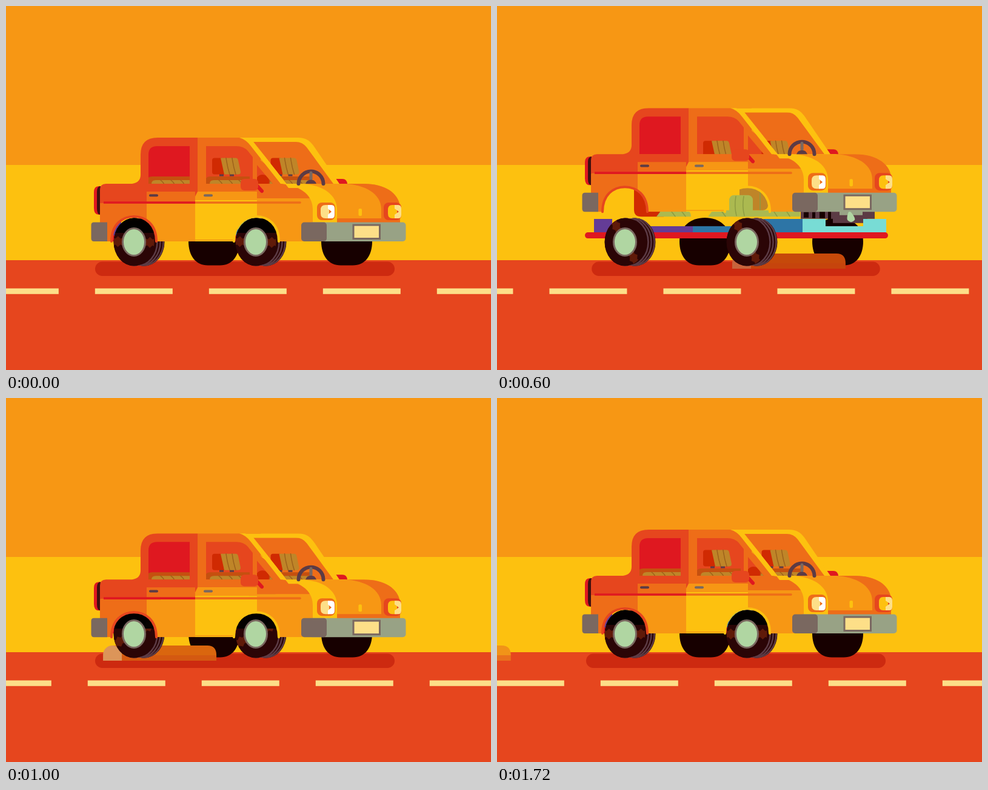
An HTML page for the animation above (1.74 s loop, 800 by 600 pixels).

```html
<!DOCTYPE html>
<html lang="en">
<head>
<meta charset="utf-8">
<title>Bouncing car</title>
<style>
html, body { margin: 0; width: 100%; height: 100%; overflow: hidden; background: #f79714; }
svg { display: block; width: 100vw; height: 100vh; }
.sky { fill: #f79714 } .sun { fill: #fdc10f } .red { fill: #e6461e } .rust { fill: #ee6d18 }
.ruby { fill: #df1820 } .seat { fill: #d02a02 } .tan { fill: #bf8528 } .brown { fill: #c5500f }
.green { fill: #abb950 } .plum { fill: #5c3b45 } .grey { fill: #7a6860 } .sage { fill: #98a285 }
.cream { fill: #fddf88 } .aqua { fill: #78dcd5 } .blue { fill: #2d75a6 } .violet { fill: #643c96 }
.night { fill: #170000 } .mint { fill: #b0d6a2 }
.line { fill: none; stroke-linecap: round }
</style>
</head>
<body>
<svg viewBox="0 0 800 600" preserveAspectRatio="none">
  <defs>
    <clipPath id="shell"><path d="M155 303Q155 293 165 293H208Q222 291 222 278V245Q222 217 250 217H482C494 217 501 222 507 230L550 293H590C625 293 647 308 650 330V388H451C451 360 432 348 413 348S376 360 376 388H249C249 360 230 348 211 348S174 360 174 388H158Q155 388 155 385Z"/></clipPath>
    <clipPath id="panes"><path id="glass" d="M235 293V245Q235 231 249 231H303V293ZM330 231H380Q392 231 399 239L407 249V293H330ZM414 262L440 293H414ZM408 224H478Q489 224 496 233L540 293H463Z"/></clipPath>
    <clipPath id="tyre"><ellipse rx="33.5" ry="39.5"/><ellipse cx="17" rx="33.5" ry="39.5"/></clipPath>
    <clipPath id="face"><ellipse rx="33.5" ry="39.5"/></clipPath>
    <g id="headrest">
      <path class="plum" d="M12 24h7v6h-7zM29 24h7v6h-7z"/>
      <path class="seat" d="M4 0H16L20 27H4Q0 27 0 23V4Q0 0 4 0Z"/>
      <path class="tan" d="M14 0H39Q42 0 43 4L47 23Q47 27 43 27H20Z"/>
      <path class="line" stroke="#9d611b" stroke-width="1.5" d="M23 0Q25 15 29 27M33 0Q35 15 39 27"/>
    </g>
    <g id="bench">
      <path class="brown" d="M0 18V7Q0 0 8 0H73V18Z"/>
      <path class="tan" d="M7 18V12Q7 6 14 6H73V18Z"/>
      <path class="line" stroke="#9d611b" stroke-width="1.5" d="M22 6Q26 9 28 13M39 6Q43 9 45 13M55 6Q59 9 61 13"/>
    </g>
  </defs>

  <rect class="sky" width="800" height="262"/>
  <rect class="sun" y="262" width="800" height="157"/>
  <rect class="red" y="419" width="800" height="181"/>
  <g id="dashes" class="cream"></g>
  <rect id="shadow" y="421.5" height="23.5" rx="11.7" fill="#cd2a10"/>

  <g class="night">
    <path id="far" d="M301 388C301 363 320 349 343 349S385 363 385 388C385 412 373 427.500 353 427.500H333C313 427.500 301 412 301 388Z"/>
    <use href="#far" x="219"/>
  </g>

  <g id="bump">
    <path id="bumpTop" d="M14 408H172Q187 408 187 424H14Z"/>
    <path id="bumpSide" d="M14 424H187V433H14Z"/>
    <path id="bumpCap" d="M0 433V423A15.500 15 0 0 1 31 423V433Z"/>
  </g>

  <g id="inside">
    <path class="seat" d="M226 320H255V366H275V375.500H238Q226 375.500 226 364Z"/>
    <path class="green" d="M263 375.500L271 365H312Q320 366 320 375.500ZM348 375.500L356 365H500V375.500Z"/>
    <rect class="tan" x="400" y="315" width="47" height="50" rx="8"/>
    <rect class="green" x="383" y="340" width="39" height="35.500" rx="8"/>
    <path class="line" stroke="#8d9b41" stroke-width="1.500" d="M287 366L294 375M304 366L311 375M370 366L377 375M394 342Q391 358 395 374M407 342Q404 358 408 374M434 320V364M456 366L462 375M477 366L483 375"/>
    <path class="plum" d="M501 358H623V379H611V386H554V379H501Z"/>
    <path class="night" d="M506 368h8v9h-8zM520 368h5v10h-5zM532 366h9v12h-9zM546 364h5v21h-5z"/>
    <path class="sage" d="M503 361h36v4h-36zM565 367h38v6h-38z"/>
    <path class="mint" d="M581 365Q592 377 590 381Q584 388 578 381Q576 376 581 365Z"/>
  </g>

  <g id="chassis">
    <path class="violet" d="M160 356H190V368H323V378H160Z"/>
    <path class="blue" d="M323 368H440V356H504V378H323Z"/>
    <path class="aqua" d="M504 356H542V368H604V356H642V378H504Z"/>
    <rect class="ruby" x="145" y="378" width="500" height="10" rx="5"/>
  </g>

  <g id="wheels"></g>

  <g id="body">
    <path class="ruby" d="M156 297H153Q145 297 145 307V333Q145 344 153 344H156Z"/>
    <path fill="#40100f" d="M156 297Q150 297 150 306V334Q150 344 156 344Z"/>
    <path class="ruby" d="M533 293Q535 285 543 285H555Q562 285 563 293Z"/>
    <g clip-path="url(#shell)">
      <rect class="red" x="140" y="210" width="176" height="115"/>
      <rect class="rust" x="140" y="325" width="92" height="70"/>
      <rect class="rust" x="232" y="306" width="80" height="20"/>
      <rect class="sky" x="232" y="326" width="80" height="66"/>
      <path class="rust" d="M316 210H420V306H316Z"/>
      <path class="sky" d="M316 306H414V320H312V314Z"/>
      <rect class="sun" x="312" y="320" width="102" height="72"/>
      <rect class="sky" x="312" y="385" width="65" height="1.500"/>
      <rect class="sky" x="414" y="317" width="92" height="75"/>
      <path class="rust" d="M414 250L440 270L457 293C478 296 497 304 503 317H414Z"/>
      <path class="sun" d="M388 217H560V300H466L412 230Q401 219 388 217Z"/>
      <path class="sky" d="M480 293H660V357H546Z"/>
      <path class="sun" d="M455 293H485C525 294 546 313 546 335V357H506V335C506 309 482 296 455 293Z"/>
      <path class="rust" d="M560 293H600C630 294 650 310 650 330V357H619V335C619 309 592 295 560 293Z"/>
      <rect class="rust" x="546" y="350" width="104" height="8"/>
    </g>
    <g clip-path="url(#panes)">
      <rect class="ruby" x="235" y="224" width="68" height="69"/>
      <path class="red" d="M330 224H400L460 293H330Z"/>
      <path class="rust" d="M408 224H550V293H463Z"/>
      <g id="cabin">
        <use href="#bench" x="233" y="281"/>
        <use href="#bench" x="329" y="281"/>
        <use href="#bench" x="428" y="281"/>
        <use href="#headrest" x="340" y="250.500"/>
        <use href="#headrest" x="436.500" y="250.500"/>
        <circle class="seat" cx="423" cy="289" r="11"/>
      </g>
    </g>
    <path class="rust" d="M407 246L414 255V293H407Z"/>
    <path class="sun" d="M394 217Q404 219 413 231L462 293H453L404 231Q396 220 385 217Z"/>
    <g class="line" stroke="#5c3b45" stroke-linecap="butt">
      <path stroke-width="6" d="M482.500 293A20.500 20.500 0 0 1 523.500 293"/>
      <path stroke="#7a6860" stroke-width="5" d="M503 275V285"/>
    </g>
    <path class="plum" d="M494 293A9.500 9.500 0 0 1 512 293Z"/>
    <path class="line" stroke="#df1820" stroke-width="6" stroke-linecap="butt" d="M412 294L422 305"/>
    <rect class="red" x="387" y="285" width="29" height="19" rx="6"/>
    <g class="line" stroke-width="3.600">
      <path stroke="#ee6d18" d="M312 324H485"/>
      <path stroke="#df1820" stroke-linecap="butt" d="M161 324H312"/>
      <path stroke="#5c3b45" stroke-width="4" d="M238 312.300H249"/>
      <path stroke="#7a6860" stroke-width="4" d="M328 312.300H339"/>
    </g>
    <g class="line" stroke-width="4">
      <path stroke="#e6461e" d="M174 388C174 360 192 347 211 347S248 360 248 388"/>
      <path stroke="#fdc10f" d="M376 388C376 360 394 347 413 347S450 360 450 388"/>
    </g>
    <rect class="rust" x="513" y="324" width="30" height="29" rx="8"/>
    <path class="cream" d="M527 328H533V350H527Q519 350 519 342V336Q519 328 527 328Z"/>
    <path fill="#fff" d="M531 328H537Q542 328 542 334V344Q542 350 537 350H531V344L537 339L531 334Z"/>
    <rect class="red" x="623" y="324" width="29" height="29" rx="8"/>
    <path class="sun" d="M637 328H645V350H637Q630 350 630 342V336Q630 328 637 328Z"/>
    <path class="cream" d="M641 328H647Q652 328 652 334V344Q652 350 647 350H641V344L648 339L641 334Z"/>
    <rect class="sun" x="581.500" y="334" width="5.500" height="12" rx="2"/>
    <path class="grey" d="M145 356.500H167V388H145Q140.500 388 140.500 383V361Q140.500 356.500 145 356.500Z"/>
    <rect class="sage" x="500" y="356.500" width="159.500" height="31.500" rx="5"/>
    <rect class="grey" x="487" y="356.500" width="42" height="31.500" rx="5"/>
    <rect class="cream" x="573" y="361" width="43.500" height="22.500" stroke="#7a6860" stroke-width="3"/>
  </g>
</svg>
<script>
const LOOP = 1740;
const el = id => document.getElementById(id);
const shift = (node, x, y) => node.setAttribute('transform', `translate(${x} ${y})`);
const mix = (a, b, u) => a + (b - a) * u;
const smooth = u => (1 - Math.cos(Math.PI * u)) / 2;

// keys: [time, value] pairs
function track(keys, t, ease = u => u) {
  const i = keys.findIndex(k => k[0] > t);
  if (i < 0) return keys[keys.length - 1][1];
  if (i === 0) return keys[0][1];
  const [t0, a] = keys[i - 1], [t1, b] = keys[i];
  return mix(a, b, ease((t - t0) / (t1 - t0)));
}

function tint(stops, u) {
  const i = Math.min(Math.floor(u), stops.length - 2);
  return `rgb(${stops[i].map((c, k) => Math.round(mix(c, stops[i + 1][k], u - i)))})`;
}

const lift = [[0, 0], [405, 0], [670, -58], [960, 10], [1090, -7], [1270, 1], [1400, -0.5], [1500, 0]];
const road = [[0, 0], [500, 587], [720, 671], [1000, 953], [1200, 1000], [1460, 1146], [1720, 1292], [1740, 1316]];
const bumpX = [[0, 885], [500, 435], [720, 332.5], [1000, 160.5], [1200, 76], [1460, -44], [1720, -163], [1740, -187]];
const spin = [[0, 0], [500, 690], [720, 880], [1000, 1235], [1200, 1440], [1460, 1710], [1720, 1980]];
const fade = [[720, 0], [1200, 1], [1720, 2]];
const paint = {
  bumpTop: [[198, 73, 10], [232, 123, 17], [241, 147, 24]],
  bumpSide: [[198, 68, 12], [222, 104, 20], [233, 113, 28]],
  bumpCap: [[200, 100, 60], [234, 183, 110], [247, 200, 125]]
};

el('dashes').innerHTML = [0, 1, 2, 3, 4, 5]
  .map(i => `<rect x="${i * 188}" y="465.500" width="128" height="9.300"/>`).join('');

const mark = 'M-8 -45H8L5 -36L9 -31L5 -26L8 -18H-8L-5 -26L-9 -31L-5 -36Z';
el('wheels').innerHTML = [211, 412].map(x => `
  <g transform="translate(${x} 389)">
    <g clip-path="url(#tyre)">
      <rect x="-40" y="-45" width="100" height="90" fill="#2b0506"/>
      <g class="line" stroke="#5c3b45" stroke-width="2.500">
        ${[5, 10, 15].map(c => `<ellipse cx="${c}" rx="33.500" ry="39.500"/>`).join('')}
      </g>
      <ellipse rx="33.500" ry="39.500" fill="#2b0506"/>
      <g clip-path="url(#face)"><g transform="scale(.85 1)"><g class="marks" fill="#5f1a09">
        <path d="${mark}"/><path d="${mark}" transform="rotate(180)"/>
      </g></g></g>
      <rect class="shade" x="-40" y="-60" width="100" height="45" opacity=".93"/>
    </g>
    <ellipse class="mint" rx="18.500" ry="22.500" stroke="#7a6860" stroke-width="3"/>
  </g>`).join('');

const marks = document.querySelectorAll('.marks');
const shades = document.querySelectorAll('.shade');

function draw(t) {
  const dy = track(lift, t, smooth);
  const seatDy = dy < 0 ? dy * 0.58 : dy;
  shift(el('body'), 0, dy);
  shift(el('cabin'), 0, seatDy - dy);
  shift(el('inside'), 0, seatDy);
  shift(el('chassis'), 0, Math.min(0, dy * 0.1));

  const inset = Math.max(0, (-dy - 17) * 0.29);
  el('shadow').setAttribute('x', 147 + inset);
  el('shadow').setAttribute('width', 494 - 2 * inset);

  const phase = (((148 - track(road, t)) % 188) + 188) % 188;
  shift(el('dashes'), phase - 188, 0);
  shift(el('bump'), track(bumpX, t), 0);
  for (const id in paint) el(id).setAttribute('fill', tint(paint[id], track(fade, t)));

  const angle = 90 + track(spin, t);
  marks.forEach(m => m.setAttribute('transform', `rotate(${angle})`));
  shades.forEach(s => s.setAttribute('height', Math.max(0, 45 + dy)));
}

const start = performance.now();
function tick() {
  draw((performance.now() - start) % LOOP);
  requestAnimationFrame(tick);
}
draw(0);
requestAnimationFrame(tick);
</script>
</body>
</html>
```
